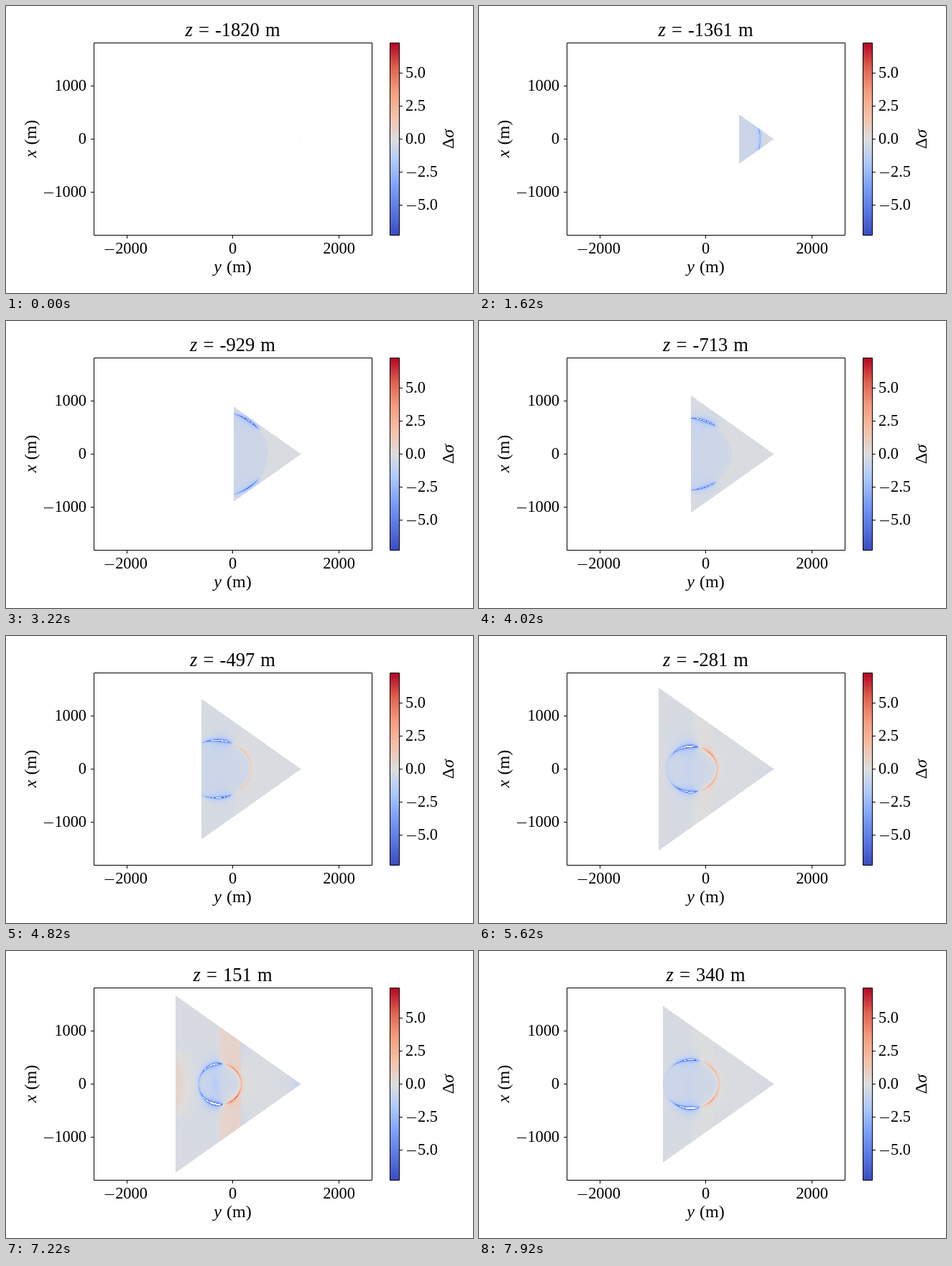
These frames come from a looping animation (650x400 px, 8000 ms). An HTML page with a canvas:

```html
<!DOCTYPE html>
<html lang="en">
<head>
<meta charset="utf-8">
<title>Slices of Δσ</title>
<style>
html, body { margin: 0; width: 100%; height: 100%; overflow: hidden; background: #fff; }
canvas, svg { position: absolute; left: 0; top: 0; }
text { font: 22.3px "Liberation Serif", "Times New Roman", serif; }
.label { font-size: 24px; word-spacing: 1px; }
.title { font-size: 26.5px; word-spacing: 1.5px; }
.i { font-style: italic; }
path { stroke: #000; fill: none; }
</style>
</head>
<body>
<canvas id="plot" width="650" height="400"></canvas>
<svg id="axes" width="650" height="400">
  <path d="M122.5 51.5H509.5V319.5H122.5ZM534.5 51.5H547.5V319.5H534.5Z"/>
  <text class="title" x="315.5" y="42" text-anchor="middle"><tspan class="i">z</tspan> = <tspan id="depth"></tspan> m</text>
  <text class="label" x="315.5" y="371" text-anchor="middle"><tspan class="i">y</tspan> (m)</text>
  <text class="label" transform="translate(42 185) rotate(-90)" text-anchor="middle"><tspan class="i">x</tspan> (m)</text>
  <text class="label" transform="translate(623 185.5) rotate(-90)" text-anchor="middle">Δ<tspan class="i">σ</tspan></text>
</svg>
<script>
const ctx = document.getElementById('plot').getContext('2d');
const axes = document.getElementById('axes');
const depth = document.getElementById('depth');
const LIMIT = 7.28, APEX = 410, MID = 185, SCALE = 0.0737;
const LEFT = 123, TOP = 52, W = 386, H = 267;
const image = ctx.createImageData(W, H);

const stops = [[59, 76, 192], [88, 118, 226], [123, 158, 248], [172, 200, 253], [221, 221, 221],
  [246, 191, 166], [245, 156, 125], [222, 96, 77], [180, 4, 38]];

function colour(v) {
  const p = Math.max(0, Math.min(7.999, (v / LIMIT + 1) * 4));
  const i = Math.floor(p);
  return stops[i].map((c, j) => c + (stops[i + 1][j] - c) * (p - i));
}

function add(tag, attrs, text = '') {
  const el = document.createElementNS('http://www.w3.org/2000/svg', tag);
  for (const key in attrs) el.setAttribute(key, attrs[key]);
  el.textContent = text;
  axes.append(el);
}

function number(text, x, y, anchor, minusX) {
  add('text', { x, y, 'text-anchor': anchor }, text);
  if (minusX) add('path', { d: `M${minusX} ${y - 5.5}h13` });
}

function drawAxes() {
  for (const [y, text, minus] of [[111, '1000'], [185, '0'], [259, '1000', 53]]) {
    add('path', { d: `M122 ${y + .5}h-4` });
    number(text, 112, y + 7, 'end', minus);
  }
  for (const [x, text, minus] of [[168, '2000', 137.5], [315, '0'], [463, '2000']]) {
    add('path', { d: `M${x + .5} 320v4` });
    number(text, minus ? 174.5 : x + .5, 345, 'middle', minus);
  }
  for (const v of [5, 2.5, 0, -2.5, -5]) {
    const y = Math.round(MID - v * 18.4);
    add('path', { d: `M548 ${y + .5}h4` });
    number(Math.abs(v).toFixed(1), v < 0 ? 573 : 556, y + 7, 'start', v < 0 && 558);
  }
  for (let y = 52; y < 319; y++) {
    ctx.fillStyle = `rgb(${colour((MID - y) / 18.4).map(Math.round)})`;
    ctx.fillRect(535, y, 12, 1);
  }
}

// Edges of the valid region near z = 0: [distance inside, sign, falloff]
function edges(x, y) {
  const oval = (Math.hypot((x - 290.5) / 18, y / 27) - 1) * 18;
  if (x > 326) return [
    [x - 347 + y * y / 20, 1, 12],
    [(18 + (x - 331) * 1.75 - y) / 2, -1, 9],
    [377 + y * y / 17 - x, -1, 10]];
  if (x > 296) return [
    [oval, -1, 6],
    [320 + y * y / 80 - x, 1, 6],
    [27 - .48 * (x - 296) - y, 1, 3]];
  return [
    [x - 272 + y * y / 116, Math.tanh((45 - y) / 5), 10],
    [290 + (y - 60) ** 2 / 180 - x, Math.tanh((68 - y) / 6), 9],
    [oval, -1, 5]];
}

// Shape and strength of the ring in the slice at height z
function ringAt(z) {
  const far = Math.abs(z);
  return {
    a: Math.hypot(27, .0825 * z),
    b: Math.hypot(27, .06 * z),
    cx: 298 - .02 * (Math.hypot(z, 250) - 250),
    turn: Math.min(1.05, .05 + .00087 * far),
    gain: 1 / (1 + (z / 800) ** 2),
    near: Math.min(1, (11 / far) ** 2),
    side: Math.sign(z)
  };
}

// Signed strength along the ring: blue behind the turning point, red ahead of it
function strength(c, s, r) {
  const p = (c - r.turn) / r.gain;
  const sway = p < 0
    ? 17 * Math.tanh(6 * p) * Math.exp(-(((p + .45) / .55) ** 2))
    : 13 * (c - r.turn) * (.3 + 1.3 * s * s);
  return sway * r.gain * (1 + .2 * r.side * s);
}

function field(x, dy, r) {
  const u = (x - r.cx) / r.a, w = dy / r.b;
  const q = Math.hypot(u, w) || 1e-6;
  const d = (q - 1) * (r.a + r.b) / 2;
  const ring = strength(u / q, w / q, r) / (Math.abs(d) + .9) ** 1.5;
  let v = (1 - r.near) * (ring + (d < 0 ? -.6 : -.2));

  if (r.near > .001) {
    const y = Math.abs(dy);
    let sum = 0;
    for (const [dist, sign, fall] of edges(x, y)) {
      const e = Math.min(20, Math.exp(-dist / fall));
      if (e * r.near > 1) return NaN;
      sum += sign * e;
    }
    v += r.near * (LIMIT * sum + (x < 296 ? 1.5 - 6 * (y / 134) ** 4 : .5));
    // Opposite edges may add up past the scale inside the region
    if (r.near > .3) v = Math.max(-LIMIT, Math.min(LIMIT, v));
  }
  return v;
}

function drawSlice(z) {
  const r = ringAt(z);
  const edge = APEX - (1820 - Math.abs(z)) * Math.SQRT2 * SCALE;
  image.data.fill(255);
  for (let j = 0; j < H; j++) {
    const dy = j + TOP - MID;
    const end = APEX - Math.abs(dy) * Math.SQRT2;
    for (let x = Math.round(edge); x <= end; x++) {
      const v = field(x, dy, r);
      if (!(Math.abs(v) <= LIMIT)) continue;
      image.data.set(colour(v), (j * W + x - LEFT) * 4);
    }
  }
  ctx.putImageData(image, LEFT, TOP);
  depth.textContent = z;
}

let shown = -1;
const start = performance.now();

function tick() {
  const t = (performance.now() - start) % 8000;
  const step = Math.floor((t + 80) / 100);
  if (step !== shown) drawSlice(-1820 + 27 * step);
  shown = step;
  requestAnimationFrame(tick);
}

drawAxes();
tick();
</script>
</body>
</html>
```
